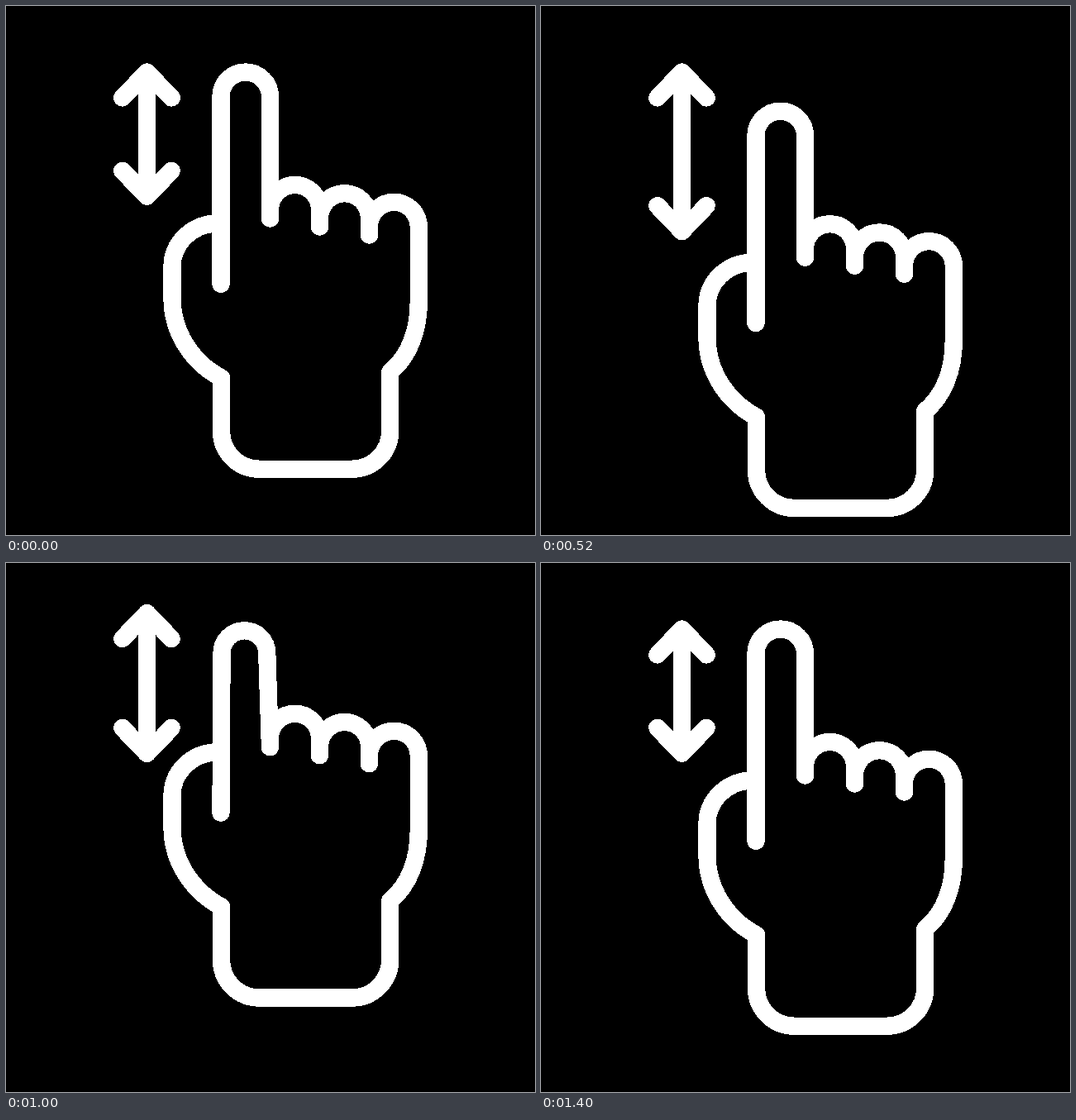
An HTML page that plays this animation: 640x640 px, repeating every 1480 ms.

```html
<!DOCTYPE html>
<html lang="en">
<head>
<meta charset="utf-8">
<title>Vertical swipe</title>
<style>
  html, body { margin: 0; width: 100%; height: 100%; overflow: hidden; background: #000; }
  svg { display: block; width: 100%; height: 100%; shape-rendering: crispEdges; }
  path { fill: none; stroke: #fff; stroke-width: 21.33; stroke-linecap: round; stroke-linejoin: round; }
  .thumb { stroke-linecap: butt; }
</style>
</head>
<body>
<svg viewBox="0 0 640 640">
  <path id="arrow"/>
  <g id="hand">
    <path id="finger"/>
    <path d="M319.5 257V246.5A30 30 0 0 1 379.5 246.5V267M379.5 256.7A30 30 0 0 1 439.5 256.7V277M439.5 267.3A29.9 29.9 0 0 1 499.3 267.3V357C499.3 394 487 424 464.7 443V514A46 46 0 0 1 418.7 560.2H306.5A46 46 0 0 1 260.5 514V450"/>
    <path class="thumb" d="M260.5 450C225 431 201 395 201 353V316C201 287 224 265 253 263"/>
  </g>
</svg>
<script>
  const LOOP = 1480, STEP = 40;
  const el = id => document.getElementById(id);
  const arrow = el('arrow'), hand = el('hand'), finger = el('finger');

  // Cubic ease with given start and end slopes
  const ease = (p, s0 = 0, s1 = 0) =>
    p * s0 + p * p * (3 - 2 * s0 - s1) + p ** 3 * (s0 + s1 - 2);

  // Keys: [time, value, start slope, end slope], slopes describe the way to that key
  function track(keys, t) {
    let [t0, v0] = keys[0];
    for (const [t1, v1, s0, s1] of keys) {
      if (t < t1) return t <= t0 ? v0 : v0 + (v1 - v0) * ease((t - t0) / (t1 - t0), s0, s1);
      t0 = t1;
      v0 = v1;
    }
    return v0;
  }

  const handY = [[40, 0], [480, 51], [720, 0], [1160, -43.6, 1, 0], [1400, 0, 1, 1]];
  const bend = [[40, 0], [260, 1], [480, 0], [720, 0], [940, 1], [1160, 0]];
  const tipDown = [[40, 0], [500, 42.5], [1020, 0]];
  const tipUp = [[800, 0], [1160, -43.6, 0, 1], [1400, 0, 1, 1]];

  function draw(t) {
    const b = track(bend, t);
    const left = 260 + 1.3 * b, right = 319.5 - 4.6 * b;
    const r = (right - left) / 2, y = 80 + 44 * b + r;
    finger.setAttribute('d', `M260 336.3L${left} ${y}A${r} ${r} 0 0 1 ${right} ${y}L319.5 257`);
    hand.setAttribute('transform', `translate(0 ${track(handY, t)})`);

    const top = 80 + track(tipUp, t), low = 230.3 + track(tipDown, t);
    arrow.setAttribute('d', `M170.5 ${top}V${low}` +
      `M140.8 ${top + 31}L170.5 ${top}L200.2 ${top + 31}` +
      `M140.8 ${low - 31}L170.5 ${low}L200.2 ${low - 31}`);
  }

  const start = performance.now();
  function tick() {
    const t = (performance.now() - start) % LOOP;
    draw(Math.floor(t / STEP) * STEP);
    requestAnimationFrame(tick);
  }
  tick();
</script>
</body>
</html>
```
